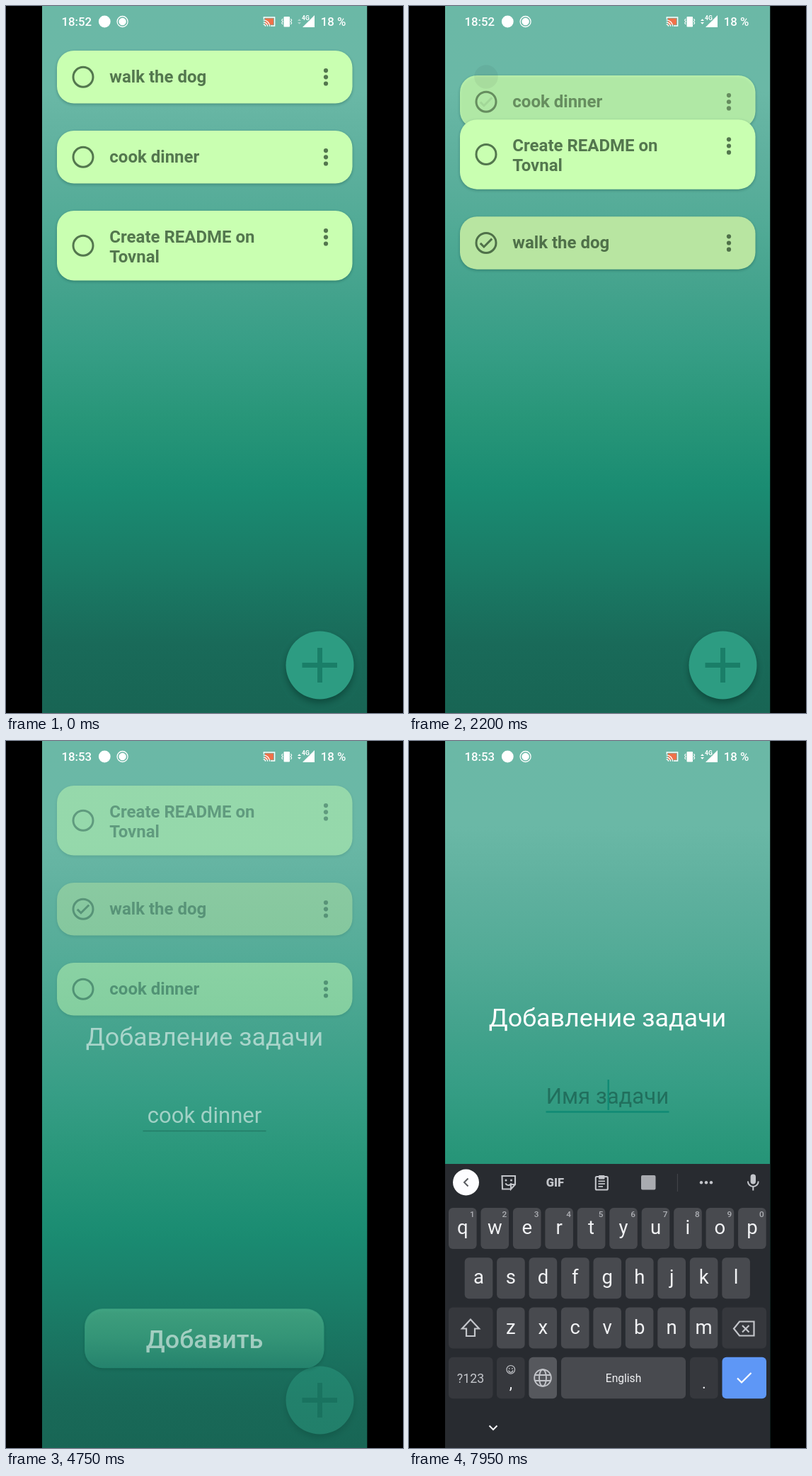
Recreate the animation shown at these times as an HTML page with a canvas. Size 561x998 px, loop 8000 ms.

```html
<!DOCTYPE html>
<html lang="en">
<head>
<meta charset="utf-8">
<title>Task list</title>
<style>
html, body { margin: 0; width: 100%; height: 100%; overflow: hidden; background: #000; }
canvas { display: block; width: 561px; height: 998px; }
</style>
</head>
<body>
<canvas id="stage" width="561" height="998"></canvas>
<script>
const ctx = document.getElementById('stage').getContext('2d');
const LOOP = 8000, LEFT = 51, RIGHT = 510.5;

const clamp = v => Math.max(0, Math.min(1, v));
const phase = (t, start, length) => clamp((t - start) / length);
const ease = x => 0.5 - Math.cos(Math.PI * x) / 2;
const decel = x => 1 - (1 - x) ** 3;

// Drawing helpers
function text(s, x, y, size, color, weight = 400, align = 'left') {
  ctx.font = `${weight} ${size}px Roboto, sans-serif`;
  ctx.textAlign = align;
  ctx.fillStyle = color;
  ctx.fillText(s, x, y);
}
function box(x, y, w, h, r, color) {
  ctx.beginPath();
  ctx.roundRect(x, y, w, h, r);
  ctx.fillStyle = color;
  ctx.fill();
}
function disc(x, y, r, color) {
  ctx.beginPath();
  ctx.arc(x, y, r, 0, Math.PI * 2);
  ctx.fillStyle = color;
  ctx.fill();
}
function ring(x, y, r, width, color) {
  ctx.beginPath();
  ctx.arc(x, y, r, 0, Math.PI * 2);
  ctx.lineWidth = width;
  ctx.strokeStyle = color;
  ctx.stroke();
}
function line(points, width, color, close) {
  ctx.beginPath();
  points.forEach(([x, y]) => ctx.lineTo(x, y));
  if (close) ctx.closePath();
  ctx.lineWidth = width;
  ctx.strokeStyle = color;
  ctx.stroke();
}
function poly(points, color) {
  ctx.beginPath();
  points.forEach(([x, y]) => ctx.lineTo(x, y));
  ctx.fillStyle = color;
  ctx.fill();
}
function withShadow(color, blur, dy, draw) {
  ctx.save();
  ctx.shadowColor = color;
  ctx.shadowBlur = blur;
  ctx.shadowOffsetY = dy;
  draw();
  ctx.restore();
}
function gradient(y0, y1, stops) {
  const g = ctx.createLinearGradient(0, y0, 0, y1);
  stops.forEach(([y, c]) => g.addColorStop((y - y0) / (y1 - y0), c));
  return g;
}
function faded(alpha, draw) {
  if (alpha <= 0) return;
  ctx.save();
  ctx.globalAlpha *= alpha;
  draw();
  ctx.restore();
}

const backdrop = gradient(0, 998, [
  [0, '#6bb8a6'], [120, '#6ab8a6'], [200, '#60b19f'], [300, '#53ab97'],
  [400, '#44a38d'], [480, '#379e86'], [580, '#289679'], [680, '#1a8c72'],
  [720, '#1a866e'], [800, '#1a7a65'], [900, '#196a59'], [998, '#186554']
]);
const buttonFill = gradient(774, 858, [[774, '#62cc9e'], [815, '#4fbd95'], [858, '#33a086']]);

function drawBackdrop() {
  ctx.fillStyle = backdrop;
  ctx.fillRect(LEFT, 0, RIGHT - LEFT, 998);
}

function drawStatus(t) {
  const white = '#fff', dim = 'rgba(255,255,255,.45)';
  text(t < 4750 ? '18:52' : '18:53', 78.5, 28, 16.8, white, 500);
  disc(139.3, 22, 8.4, white);
  ring(164.6, 22, 7.5, 1.3, white);
  disc(164.6, 22, 5.2, white);
  // cast
  box(366, 17.5, 12, 9, 0, '#f0714a');
  line([[364.3, 18.5], [364.3, 16], [379.6, 16], [379.6, 28], [374, 28]], 1.4, white);
  for (const r of [3, 6, 9]) {
    ctx.beginPath();
    ctx.arc(363.6, 28.8, r, -Math.PI / 2, 0);
    ctx.lineWidth = 1.3;
    ctx.strokeStyle = white;
    ctx.stroke();
  }
  // vibrate
  box(392.5, 15, 8.5, 14.5, 1, white);
  for (const [x, d] of [[390.6, -1], [402.8, 1]]) {
    line([[x - .5 * d, 18], [x + .9 * d, 20], [x - .5 * d, 22], [x + .9 * d, 24], [x - .5 * d, 26]], 1.1, white);
  }
  // mobile signal
  const up = t > 1500 && (t < 3000 || t > 3600), down = t > 1500;
  poly([[412, 21], [414.5, 18.3], [417, 21]], up ? white : dim);
  poly([[412, 23], [414.5, 25.7], [417, 23]], down ? white : dim);
  poly([[436, 13], [436, 30], [419, 30]], white);
  box(417.5, 12, 11, 9, 0, '#6bb8a6');
  text('4G', 418, 20, 8.6, white, 700);
  text('18 %', 444.8, 28, 16.8, white, 500);
}

// Task list
const tasks = {
  walk: { lines: ['walk the dog'], h: 74.5 },
  cook: { lines: ['cook dinner'], h: 74.5 },
  readme: { lines: ['Create README on', 'Tovnal'], h: 98.5 }
};
const MOVE = 250;
const steps = [
  { at: -MOVE, order: ['walk', 'cook', 'readme'], done: [] },
  { at: 1022, moved: 'walk', order: ['cook', 'readme', 'walk'], done: ['walk'] },
  { at: 2140, moved: 'cook', order: ['readme', 'walk', 'cook'], done: ['walk', 'cook'] },
  { at: 2850, moved: 'cook', order: ['readme', 'cook', 'walk'], done: ['walk'] },
  { at: 3760, moved: 'cook', order: ['readme', 'walk', 'cook'], done: ['walk'] }
];
const taps = [[109, 100, 960], [109, 100, 2080], [109, 350, 2790], [452, 237, 3480]];

function layout(order) {
  const tops = {};
  let y = 63;
  for (const id of order) {
    tops[id] = y;
    y += tasks[id].h + 38.5;
  }
  return tops;
}

function drawCard({ lines, h }, y, done) {
  const ink = done ? '#4f7049' : '#53774e';
  const mid = y + h / 2;
  withShadow('rgba(0,50,40,.32)', 4, 1.5, () =>
    box(72, y, 417.5, h, 24, done ? '#b8e5a1' : '#c9ffb1'));
  ring(109, mid, 14, 3, ink);
  if (done) line([[100.8, mid + .4], [105.9, mid + 5.5], [117.2, mid - 5.8]], 3, ink);
  lines.forEach((s, i) => text(s, 146.3, y + 45.2 + i * 28.1, 24, ink, 700));
  for (const d of [-9.2, 0, 9.2]) disc(452, y + 37.3 + d, 3.1, ink);
}

function drawList(t) {
  const i = steps.findLastIndex(s => t >= s.at);
  const now = steps[i], before = steps[Math.max(0, i - 1)];
  const p = ease(phase(t, now.at, MOVE));
  const from = layout(before.order), to = layout(now.order);
  const ids = [...now.order].sort((a, b) => (b === now.moved) - (a === now.moved));
  for (const id of ids) {
    const y = from[id] + (to[id] - from[id]) * p;
    const was = before.done.includes(id), is = now.done.includes(id);
    if (was !== is) faded(1 - p, () => drawCard(tasks[id], y, was));
    faded(was === is ? 1 : p, () => drawCard(tasks[id], y, is));
  }
  for (const [x, y, at] of taps) {
    const r = phase(t, at, 250);
    if (r > 0 && r < 1) disc(x, y, 10 + 14 * r, `rgba(0,0,0,${.1 * (1 - r)})`);
  }
  withShadow('rgba(0,40,30,.45)', 10, 5, () => disc(443.5, 930.5, 48, '#2d9c82'));
  box(418.5, 927, 49.5, 7, 0, '#1a7e68');
  box(440, 906, 7, 49, 0, '#1a7e68');
}

function drawMenu(cardY, isLast, open, shut, t) {
  if (t < open || t > shut + 100) return;
  const grow = decel(phase(t, open, 120));
  const alpha = grow * (1 - phase(t, shut, 100));
  const y = cardY + 55.5, grey = '#6d6d70';
  faded(alpha, () => {
    disc(455, cardY + 37, 22, 'rgba(0,0,0,.055)');
    ctx.translate(RIGHT, y);
    ctx.scale(.8 + .2 * grow, .8 + .2 * grow);
    ctx.translate(-RIGHT, -y);
    withShadow('rgba(0,30,25,.4)', 16, 7, () => box(276, y, 234.5, 230.5, 2, '#faf9fd'));
    ['Move Up', 'Move Down', 'Remove', 'Edit'].forEach((s, i) =>
      text(s, 323, y + 36.3 + i * 57.5, 19.15, i === 1 && isLast ? '#b9b9bd' : '#1c1c1e'));
    const row = i => y + 29.5 + i * 57.5;
    line([[293, row(0) + 3.5], [299.7, row(0) - 3.2], [306.4, row(0) + 3.5]], 2.3, grey);
    line([[293, row(1) - 3.5], [299.7, row(1) + 3.2], [306.4, row(1) - 3.5]], 2.3, isLast ? '#b9b9bd' : grey);
    // bin with lines
    const b = row(2);
    box(287.7, b - 9.5, 14, 2.6, 0, grey);
    box(291.5, b - 11, 6.5, 2, 0, grey);
    box(289, b - 5.8, 11.8, 15.3, 2, grey);
    [9.3, 8, 5].forEach((w, k) => box(302.5, b - 5.5 + k * 5, w, 2.3, 0, grey));
    // pencil
    const e = row(3);
    poly([[288.5, e + 10], [288.5, e + 5.3], [301.3, e - 7.5], [306, e - 2.8], [293.2, e + 10]], grey);
    poly([[302.7, e - 8.9], [305, e - 11], [307, e - 11], [310, e - 8], [310, e - 6], [307.4, e - 4.2]], grey);
  });
}

// Edit screen
const FOCUS = 6200, ERASE = 6950, BEAT = 72;
const word = 'cook dinner';
const erasedAt = t => Math.max(0, Math.min(word.length, Math.floor((t - ERASE) / BEAT) + 1));

function drawEdit(t) {
  drawBackdrop();
  text('Добавление задачи', 280.5, 403, 35.9, '#fff', 400, 'center');
  const focus = t >= FOCUS;
  const gone = t < ERASE ? 0 : erasedAt(t);
  const value = word.slice(0, word.length - gone);
  text(value || 'Имя задачи', 280.5, 511.8, 31.1, value ? '#fff' : '#216f5d', 400, 'center');
  if (focus) {
    box(193.5, 522.3, 174, 2.5, 0, '#108a74');
    const since = t - (gone ? ERASE + (gone - 1) * BEAT : FOCUS);
    const width = value ? ctx.measureText(value).width : 0;
    if (since % 1000 < 500) box(280.5 + width / 2, 478, 2.4, 43, 0, '#108a74');
  } else {
    box(193.5, 522.6, 174, 1.4, 0, '#1b6653');
  }
  withShadow('rgba(0,45,35,.45)', 5, 2, () => box(111, 774, 338.5, 84, 26, buttonFill));
  ctx.beginPath();
  ctx.roundRect(111.5, 774.5, 337.5, 83, 26);
  ctx.lineWidth = 1;
  ctx.strokeStyle = 'rgba(35,135,110,.6)';
  ctx.stroke();
  text('Добавить', 280.5, 830, 35.9, '#fff', 500, 'center');
}

// Keyboard
const KEY = '#484a4f', SIDE = '#36383d', PALE = '#c3c5ca', INK = '#f1f2f4';

function drawToolbar() {
  disc(80.5, 623, 18.5, '#fdfdff');
  line([[83.5, 617.5], [78, 623], [83.5, 628.5]], 2, '#5a5c61');
  // sticker
  line([[144, 632.5], [132, 632.5], [131.5, 614], [150, 614], [150, 626], [144, 632.5], [144, 626], [150, 626]], 2.1, PALE);
  disc(137, 620, 1.5, PALE);
  disc(144.5, 620, 1.5, PALE);
  ctx.beginPath();
  ctx.arc(140.5, 622.5, 4.5, .4, 2.7);
  ctx.stroke();
  text('GIF', 206.3, 629, 16.5, PALE, 900, 'center');
  // clipboard
  ctx.beginPath();
  ctx.roundRect(263.8, 615, 17, 18.5, 1.5);
  ctx.lineWidth = 2.1;
  ctx.strokeStyle = PALE;
  ctx.stroke();
  box(268, 613, 8.5, 5.5, 1, PALE);
  for (const [y, w] of [[620.5, 9.5], [624.3, 9.5], [628, 6.5]]) box(267.5, y, w, 1.8, 0, PALE);
  box(328, 613, 20.5, 20.5, 2, '#a9abb0');
  box(378.8, 611, 1.2, 25, 0, '#414348');
  for (const x of [413, 420, 427]) disc(x, 623.3, 2.2, PALE);
  // microphone
  box(482.6, 611.5, 7.4, 14, 3.7, PALE);
  ctx.beginPath();
  ctx.arc(486.3, 621.5, 7.4, 0, Math.PI);
  ctx.lineWidth = 2;
  ctx.strokeStyle = PALE;
  ctx.stroke();
  box(485.3, 629, 2, 5.5, 0, PALE);
}

function drawRow(letters, x0, y, numbered) {
  [...letters].forEach((c, i) => {
    const x = x0 + i * 45.45;
    box(x, y, 39.6, 58, 6, KEY);
    text(c, x + 19.8, y + 37, 27.5, INK, 400, 'center');
    if (numbered) text((i + 1) % 10, x + 33.3, y + 13.2, 11.8, '#aeb0b5', 500, 'center');
  });
}

function drawKeyboard(t) {
  if (t < FOCUS + 60) return;
  ctx.save();
  ctx.translate(0, 401 * (1 - decel(phase(t, FOCUS + 60, 250))));
  box(LEFT, 597, RIGHT - LEFT, 401, 0, '#282b30');
  drawToolbar();
  drawRow('qwertyuiop', 56, 659, true);
  drawRow('asdfghjkl', 78.7, 729.3);
  drawRow('zxcvbnm', 124, 799.5);

  box(56, 799.5, 62.5, 58, 6, SIDE);
  line([[87, 816.5], [75, 829.5], [81, 829.5], [81, 840], [93, 840], [93, 829.5], [99, 829.5]], 2.2, PALE, true);
  const held = t > ERASE - 30 && t < ERASE + BEAT * word.length;
  box(442.5, 799.5, 62.5, 58, 6, held ? '#5a5c62' : SIDE);
  line([[459, 829.5], [467, 819.5], [487.5, 819.5], [487.5, 839.5], [467, 839.5]], 2.2, PALE, true);
  line([[471, 825], [480.5, 834.5]], 2.2, PALE);
  line([[480.5, 825], [471, 834.5]], 2.2, PALE);

  box(56, 869.8, 62.5, 58.5, 6, SIDE);
  text('?123', 87, 906, 17.8, PALE, 400, 'center');
  box(124, 869.8, 39.6, 58.5, 6, SIDE);
  ring(143.8, 887.3, 5.8, 1.2, PALE);
  disc(141.7, 885.8, .9, PALE);
  disc(145.9, 885.8, .9, PALE);
  ctx.beginPath();
  ctx.arc(143.8, 888.3, 2.9, 0, Math.PI);
  ctx.stroke();
  text(',', 143.8, 914, 22, INK, 400, 'center');

  box(169.4, 869.8, 39.6, 58.5, 6, '#56585d');
  ring(189, 899, 11.8, 1.9, PALE);
  ctx.beginPath();
  ctx.ellipse(189, 899, 5, 11.8, 0, 0, Math.PI * 2);
  ctx.stroke();
  for (const d of [-4, 4]) line([[178, 899 + d], [200, 899 + d]], 1.8, PALE);

  box(215, 869.8, 176, 58.5, 6, KEY);
  text('English', 303, 905, 15.6, INK, 400, 'center');
  box(397, 869.8, 39.6, 58.5, 6, SIDE);
  text('.', 417, 914, 22, INK, 400, 'center');
  box(442.5, 869.8, 62.5, 58.5, 6, '#5e97f6');
  line([[464, 899.5], [470, 905.5], [483.5, 892]], 2.2, '#fff');
  line([[113.5, 966.5], [119, 972], [124.5, 966.5]], 2, '#f4f4f6');
  ctx.restore();
}

function render(t) {
  ctx.fillStyle = '#000';
  ctx.fillRect(0, 0, 561, 998);
  ctx.save();
  ctx.beginPath();
  ctx.rect(LEFT, 0, RIGHT - LEFT, 998);
  ctx.clip();
  const edit = decel(phase(t, 4700, 220));
  if (edit < 1) {
    drawBackdrop();
    drawList(t);
    drawMenu(200, false, 3510, 3690, t);
    drawMenu(313, true, 4040, 4560, t);
  }
  faded(edit, () => {
    ctx.translate(0, 60 * (1 - edit));
    drawEdit(t);
  });
  drawKeyboard(t);
  drawStatus(t);
  ctx.restore();
}

function tick() {
  render(performance.now() % LOOP);
  requestAnimationFrame(tick);
}
tick();
</script>
</body>
</html>
```
